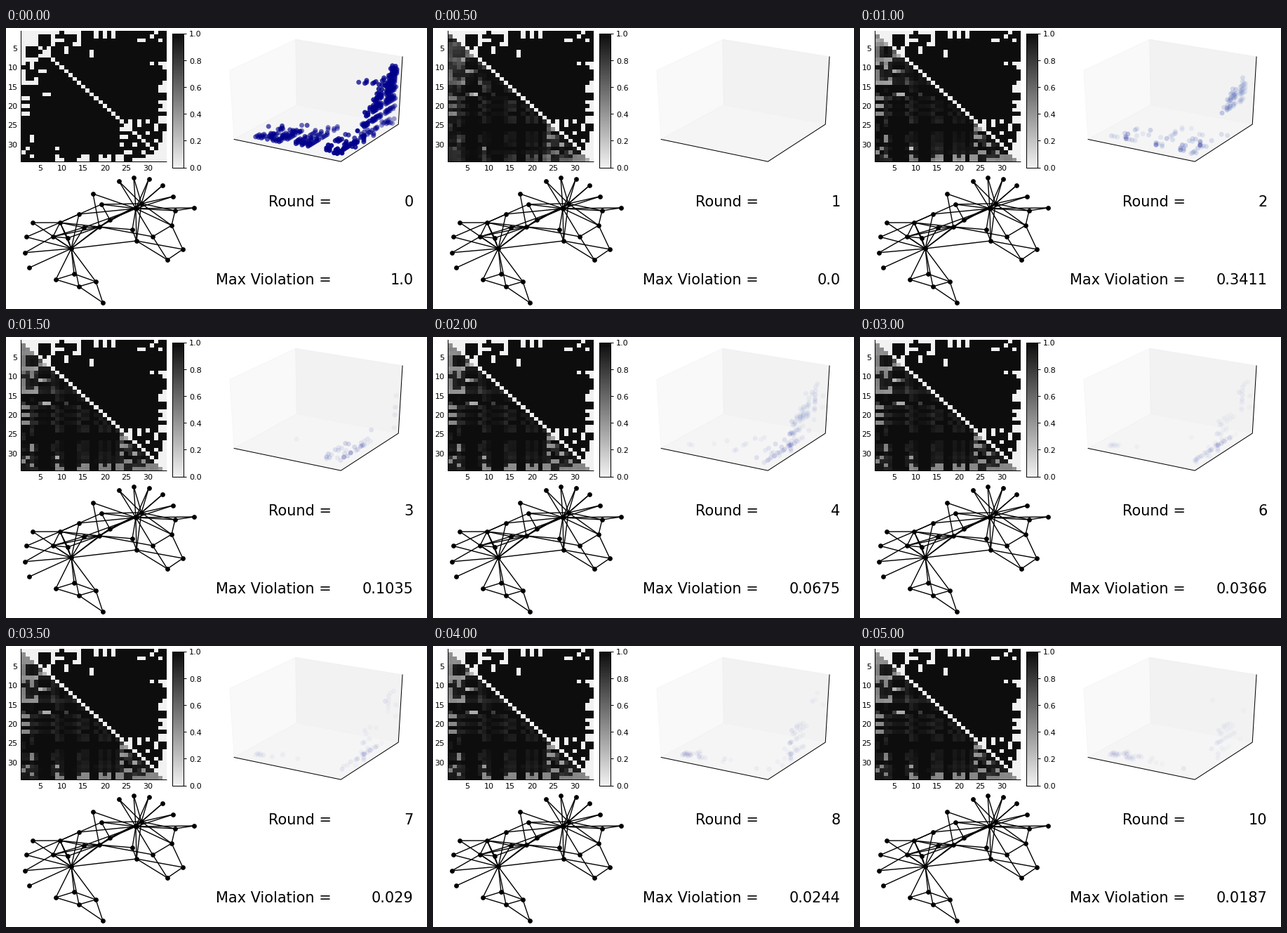
Animation, 600 px wide and 400 px high, one loop 5500 ms. Source, as a matplotlib script:

```python
from itertools import combinations

import matplotlib.pyplot as plt
import numpy as np
from matplotlib.animation import FuncAnimation
from matplotlib.colors import LinearSegmentedColormap

W, H, DPI = 600, 400, 100
PX = 72 / DPI
N = 34
VIOLATION = [1.0, 0.0, 0.3411, 0.1035, 0.0675, 0.0474,
             0.0366, 0.029, 0.0244, 0.0212, 0.0187]
ROUNDS = len(VIOLATION)


# ---- graph -----------------------------------------------------------

RIGHT_FAN = [15, 16, 19, 21, 23]   # leaves shared by hubs 33 and 34
LEFT_FAN = [18, 22, 13, 12]        # leaves around hub 1

LINKS = {
    1: [*range(2, 10), *range(11, 15), 18, 20, 22, 32],
    34: [9, 10, 14, 20, 24, *range(27, 34), *RIGHT_FAN],
    33: [3, 9, 24, 30, 31, 32, *RIGHT_FAN],
    2: [3, 4, 8, 14, 18, 20, 22, 31],
    3: [4, 8, 9, 10, 14, 28, 29],
    4: [8, 13, 14],
    5: [7, 11],
    6: [7, 11, 17],
    7: [17],
    9: [31],
    24: [26, 28, 30],
    25: [26, 28, 32],
    26: [32],
    27: [30],
    29: [32],
}
EDGES = [(a, b) for a, row in LINKS.items() for b in row]

NODES = {
    1: (93, 314), 33: (193, 250), 34: (185, 257),
    2: (77, 277), 3: (133, 283), 4: (67, 297), 8: (88, 299), 14: (111, 284),
    5: (71, 358), 6: (128, 361), 7: (104, 368), 11: (97, 350), 17: (138, 391),
    9: (148, 273), 10: (124, 236), 20: (104, 265), 31: (136, 251),
    24: (236, 281), 25: (230, 330), 26: (252, 315), 27: (268, 256),
    28: (209, 297), 29: (180, 287), 30: (241, 260), 32: (186, 303),
}


def fan(leaves, centre, radius, start, step):
    for n, v in enumerate(leaves):
        a = np.radians(start + n * step)
        NODES[v] = (centre[0] + radius * np.cos(a),
                    centre[1] - radius * np.sin(a))


fan(RIGHT_FAN, (187, 274), 61.5, 115, -20.3)
fan(LEFT_FAN, NODES[1], 66, 146, 19.5)


# ---- metric projection -----------------------------------------------

TRIPLES = list(combinations(range(N), 3))


def start_matrix():
    d = 1 - np.eye(N)
    for a, b in EDGES:
        d[a - 1, b - 1] = d[b - 1, a - 1] = 0
    return d


def triangle_list():
    """Every triangle inequality as (long side, other side, other side)."""
    out = []
    for i, j, k in TRIPLES:
        p, q, r = i * N + j, i * N + k, j * N + k
        out += [(p, q, r), (q, p, r), (r, p, q)]
    return out


def sweep(x, dual, triangles):
    """One cyclic pass of projections with dual correction."""
    for n, (e, f, g) in enumerate(triangles):
        step = max((x[e] - x[f] - x[g]) / 3, -dual[n])
        if step:
            x[e] -= step
            x[f] += step
            x[g] += step
            dual[n] += step


def solve():
    """Per round: the matrix to show and the violation of each triple."""
    d = start_matrix()
    x = d.ravel().tolist()
    triangles = triangle_list()
    e, f, g = np.array(triangles).T
    dual = [0.0] * len(triangles)
    mats, gaps = [], []
    for k in range(ROUNDS):
        if k:
            sweep(x, dual, triangles)
        flat = np.array(x)
        metric = np.triu(flat.reshape(N, N), 1)
        mats.append(np.triu(d) + metric.T)
        gaps.append((flat[e] - flat[f] - flat[g]).reshape(-1, 3).max(axis=1))
    return mats, gaps


MATS, GAPS = solve()


# ---- 3D view ---------------------------------------------------------

LIGHT = np.array([173, 205, 230]) / 255
DARK = np.array([0, 0, 139]) / 255


def project(p):
    """Perspective view of the unit cube centred on 0: x, y, depth."""
    az, el = np.radians(-60), np.radians(30)
    w = np.array([np.cos(el) * np.cos(az), np.cos(el) * np.sin(az), np.sin(el)])
    u = np.array([-np.sin(az), np.cos(az), 0])
    v = np.cross(w, u)
    p = np.asarray(p, float)
    depth = 10 - p @ w
    return 444 + 1756 * (p @ u) / depth, 100.3 - 1120 * (p @ v) / depth, depth


PLACES = (np.array(TRIPLES)[:, ::-1] + 1) / N - 0.5


def points(k):
    """Positions and colours of the violated triples, far ones first."""
    rel = GAPS[k] / GAPS[k].max()
    shown = np.flatnonzero(rel > 0.2)
    if k:
        shown = shown[np.argsort(-rel[shown])][:110]
    x, y, depth = project(PLACES[shown] * 0.96)
    order = np.argsort(-depth)
    tone = rel[shown][:, None]
    fade = 1 - 0.7 * np.clip((depth - 9.7) / 0.7, 0, 1)[:, None]
    alpha = fade * np.sqrt(VIOLATION[k]) * (0.25 + 0.75 * tone)
    rgba = np.hstack([LIGHT + (DARK - LIGHT) * tone, alpha])
    return np.column_stack([x, y])[order], rgba[order]


POINTS = [points(k) for k in range(ROUNDS)]


# ---- drawing ---------------------------------------------------------

plt.rcParams['font.family'] = 'DejaVu Sans'
fig = plt.figure(figsize=(W / DPI, H / DPI), dpi=DPI, facecolor='white')
ax = fig.add_axes([0, 0, 1, 1])
ax.axis('off')

grays = LinearSegmentedColormap.from_list('grays', [(0.95,) * 3, (0.05,) * 3])


def line(xs, ys, width=1.0):
    ax.plot(xs, ys, color='black', lw=width * PX, zorder=3, snap=False,
            solid_capstyle='projecting')


def label(x, y, s, size=8, ha='center', va='baseline'):
    return ax.text(x, y, s, fontsize=size, ha=ha, va=va, color='black')


def mesh(data, left, right, top, bottom):
    rows, cols = data.shape
    return ax.pcolormesh(np.linspace(left, right, cols + 1),
                         np.linspace(top, bottom, rows + 1), data,
                         cmap=grays, vmin=0, vmax=1, zorder=1)


# Heatmap
L, R, T, B = 21.4, 229.4, 3.9, 190.6
heat = mesh(MATS[0], L, R, T, B)
line([21.5, 21.5], [T + 0.6, 190.5])
line([21.5, R - 0.5], [190.5, 190.5])
for n in range(5, 31, 5):
    label(L + (n - 0.5) * (R - L) / N, 202.7, str(n))
    label(16.5, T + (n - 0.5) * (B - T) / N, str(n), ha='right',
          va='center_baseline')

# Colour bar
mesh(np.linspace(1, 0, 256)[:, None], 237.5, 253.5, 8.5, 199.5)
line([237.5, 253.5, 253.5, 237.5, 237.5], [8.5, 8.5, 199.5, 199.5, 8.5])
for n in range(6):
    y = 199 - n * 190.5 / 5
    line([253.5, 257], [np.floor(y) + 0.5] * 2)
    label(261.2, y, f'{n / 5:.1f}', ha='left', va='center_baseline')


# Box of the 3D view
def corners(*names):
    return zip(*(project([int(b) - 0.5 for b in c])[:2] for c in names))


for tone, names in ((0.975, ('000', '010', '011', '001')),
                    (0.95, ('010', '110', '111', '011')),
                    (0.9625, ('000', '100', '110', '010'))):
    ax.fill(*corners(*names), facecolor=str(tone),
            edgecolor=str(tone - 0.01), lw=PX, zorder=1)
line(*corners('000', '100', '110', '111'))
dots = ax.scatter([], [], s=25, linewidths=0, zorder=4)

# Graph
for a, b in EDGES:
    line(*zip(NODES[a], NODES[b]), width=1.4)
ax.scatter(*zip(*NODES.values()), s=24, color='black', linewidths=0, zorder=5)

# Read-outs
label(464, 254, 'Round =', 15, 'right')
label(464, 365, 'Max Violation =', 15, 'right')
round_text = label(580.5, 254, '', 15, 'right')
viol_text = label(580.5, 365, '', 15, 'right')

ax.set_xlim(0, W)
ax.set_ylim(H, 0)


def update(k):
    heat.set_array(MATS[k])
    xy, rgba = POINTS[k]
    dots.set_offsets(xy)
    dots.set_facecolors(rgba)
    round_text.set_text(str(k))
    viol_text.set_text(str(VIOLATION[k]))
    return heat, dots, round_text, viol_text


anim = FuncAnimation(fig, update, frames=ROUNDS, interval=500,
                     repeat=True, repeat_delay=0, blit=False)
plt.show()
```
